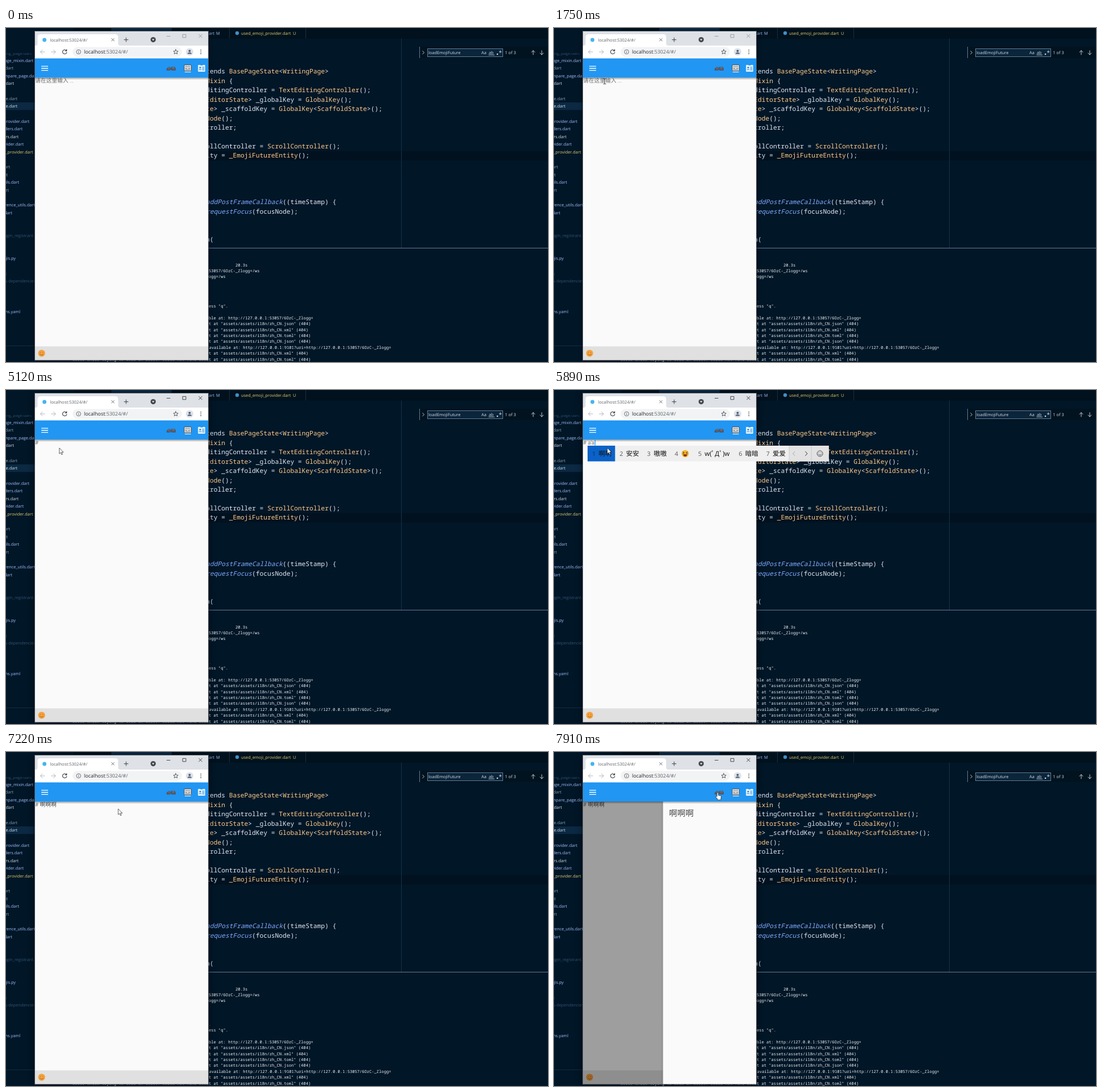
An HTML page that plays this animation: 952x588 px, repeating every 8 s.

```html
<!DOCTYPE html>
<html lang="zh">
<head>
<meta charset="utf-8">
<title>Markdown editor demo</title>
<style>
html, body { margin: 0; width: 100%; height: 100%; overflow: hidden; background: #011627; }
svg { display: block; }
text { white-space: pre; text-rendering: geometricPrecision; }
.ui { font-family: "Open Sans", "Noto Sans", sans-serif; font-size: 7.35px; }
.code { font-family: "Noto Sans Mono", "DejaVu Sans Mono", monospace; font-size: 11.23px; font-weight: 500; fill: #e3e9f4; }
.term { font-family: "Noto Sans Mono", "DejaVu Sans Mono", monospace; font-size: 7.12px; font-weight: 500; fill: #f0f2f4; }
.field { font-family: Roboto, "Noto Sans CJK SC", "Noto Sans CJK", sans-serif; font-size: 9.76px; font-weight: 300; }
.cand { font-family: "Open Sans", "Noto Sans CJK SC", "Noto Sans CJK", sans-serif; font-size: 11.5px; }
.cls { fill: #ffcb8b; }
.fn { fill: #82aaff; font-style: italic; }
.line { fill: none; stroke-linecap: round; stroke-linejoin: round; }
</style>
</head>
<body>
<svg id="stage" width="952" height="588" viewBox="0 0 952 588" xmlns="http://www.w3.org/2000/svg">
  <defs>
    <linearGradient id="barShade" x2="0" y2="1">
      <stop stop-color="#000" stop-opacity=".38"/>
      <stop offset="1" stop-color="#000" stop-opacity="0"/>
    </linearGradient>
    <linearGradient id="sideShade">
      <stop stop-color="#000" stop-opacity="0"/>
      <stop offset="1" stop-color="#000" stop-opacity=".1"/>
    </linearGradient>
    <clipPath id="app"><rect x="51" y="53" width="304.5" height="532"/></clipPath>
    <clipPath id="tree"><rect y="44" width="51" height="544"/></clipPath>
    <g id="face">
      <circle r="6.3" fill="#f6b52c"/>
      <path class="line" stroke="#59331a" d="M-4-2.8L-1.4-1.4L-4 0M4-2.8L1.4-1.4L4 0"/>
      <path fill="#7a2f18" d="M-3.6 1.2H3.6Q2.8 4.9 0 4.9T-3.6 1.2Z"/>
    </g>
  </defs>

  <rect width="952" height="588" fill="#011627"/>
  <g id="editor">
    <rect x="118" width="834" height="18.5" fill="#01111d"/>
    <rect x="185" width="106" height="18" fill="#0b2942"/>
    <path d="M392.5 0V18.5M526.5 0V18.5" stroke="#1c2c3c"/>
    <circle cx="406" cy="9" r="3.2" fill="#3f8fc9"/>
    <rect x="118" y="216.7" width="834" height="16.4" fill="#01111f"/>
    <path d="M694.5 18.5V387" stroke="#17324c"/>
    <path d="M118 387.5H952" stroke="#5f7e97"/>
    <rect y="131" width="51" height="13.4" fill="#0b2942"/>
    <path d="M0 559.5H51" stroke="#122d42"/>
  </g>
  <g id="tree-names" clip-path="url(#tree)"></g>
  <g id="source-text"></g>

  <g id="find">
    <rect x="726" y="33" width="226" height="20" fill="#021320"/>
    <path d="M726.5 33V53" stroke="#5f7e97"/>
    <rect x="740.5" y="36.5" width="132" height="14" fill="#0b253a" stroke="#5f7e97"/>
    <path class="line" stroke="#d6deeb" d="M731.7 40.5L734.5 43.2L731.7 46M926 47V39.8M923 42.7L926 39.7L929 42.7M941 39.8V47M938 44.1L941 47.1L944 44.1" stroke-width=".9"/>
    <path stroke="#d6deeb" d="M847.5 47.5H858" stroke-width=".7"/>
    <rect x="862" y="45" width="2.2" height="2.2" fill="#d6deeb"/>
  </g>

  <rect id="shade" x="50.5" y="5.5" width="305" height="579.5" fill="#dee1e6"/>
  <g id="chrome">
    <path fill="#fff" d="M50.5 31H52Q55.5 31 55.5 27V16Q55.5 11 60.5 11H192Q197 11 197 16V27Q197 31 201 31H355.5V54H50.5Z"/>
    <circle cx="67.5" cy="21" r="3.4" fill="#42b4f0"/>
    <path class="line" stroke="#5f6368" d="M185.4 18.4L190 23M190 18.4L185.4 23" stroke-width=".9"/>
    <path class="line" stroke="#3c4043" d="M207.5 20.7H214.5M211 17.2V24.2"/>
    <circle cx="258.5" cy="20.6" r="4.6" fill="#45494d"/>
    <path fill="#fff" d="M256.4 19.5H260.6L258.5 22.2Z"/>
    <path id="caption" class="line" d="M282.5 14.5H288.2M310.6 11.4H316V16.8H310.6ZM338.7 11.3L344.3 16.9M344.3 11.3L338.7 16.9" stroke-width=".8"/>
    <path class="line" stroke="#b3b6ba" d="M68 42H60.5M64 38.4L60.4 42L64 45.6M79.5 42H87M83.5 38.4L87.1 42L83.5 45.6"/>
    <path class="line" stroke="#45494d" stroke-width="1.2" d="M106 39.7A3.7 3.7 0 1 0 106.7 42.8M106.6 37.9V40.3H104.2"/>
    <rect x="117" y="33.5" width="192" height="17" rx="8.5" fill="#f1f3f4"/>
    <circle cx="127.5" cy="42" r="3.8" fill="none" stroke="#5f6368" stroke-width=".9"/>
    <path d="M127.5 41.4V44.2M127.5 39.7V40.6" stroke="#5f6368" stroke-width=".9"/>
    <path class="line" stroke="#45494d" stroke-width=".9" d="M298.2 37.9L299.4 40.6L302.3 40.9L300.1 42.8L300.8 45.7L298.2 44.2L295.6 45.7L296.3 42.8L294.1 40.9L297 40.6Z"/>
    <circle cx="322.5" cy="42" r="6.6" fill="#dde2ea"/>
    <circle cx="322.5" cy="40.3" r="1.9" fill="#4b5a70"/>
    <path fill="#4b5a70" d="M318.8 45.6Q319 43 322.5 43T326.2 45.6Z"/>
    <path stroke="#3c4043" stroke-width="1.7" stroke-linecap="round" d="M342.3 38.8V38.8M342.3 42V42M342.3 45.2V45.2"/>
  </g>

  <g clip-path="url(#app)">
    <rect x="50" y="87" width="306" height="498" fill="#fafafa"/>
    <rect x="50" y="560.5" width="306" height="25" fill="#e0e0e0"/>
    <circle cx="62.6" cy="572.6" r="6.1" fill="#f3a03c"/>
    <path class="line" stroke="#a9601c" d="M60.5 571V571.4M64.7 571V571.4M59.6 574.4Q62.6 577.4 65.6 574.4" stroke-width=".9"/>
    <g id="field"></g>
    <rect id="caret" y="88" width="1.2" height="9.6" fill="#2196f3"/>
    <g id="drawer">
      <rect x="50" y="87" width="306" height="498" opacity=".37"/>
      <rect x="187" y="87" width="4.5" height="498" fill="url(#sideShade)"/>
      <rect x="191.5" y="87" width="240" height="498" fill="#fafafa"/>
    </g>
    <rect x="50" y="87" width="306" height="4.5" fill="url(#barShade)"/>
    <rect x="50" y="53.5" width="306" height="33.7" fill="#2196f3"/>
    <path d="M62 67.4H74M62 71H74M62 74.6H74" stroke="#fff" stroke-width="1.3"/>
    <g id="tools">
      <path fill="#4f5560" d="M282 72.2L283.5 70H285V68.8H289V71H290V68.6H297V70H298V74.8H290.5V73.4H288.5V74.8H282Z"/>
      <path stroke="#a5606a" stroke-width=".8" d="M284 72.4H288M291.5 72H296.5"/>
      <path stroke="#8aa6bd" stroke-width=".7" d="M285.5 70.3H288M292 70H296"/>
      <rect x="313" y="65" width="12.4" height="10.4" rx="1" fill="#f2f2ee" stroke="#3f4852"/>
      <path class="line" stroke="#4a4f54" stroke-width=".9" d="M315 68Q317.5 67 319.2 68.4Q321 67 323.4 68M315 70.8H318M320.4 70.8H323.4M315 73H323.4"/>
      <path stroke="#f2f2ee" stroke-width="1.2" d="M314 77.3H324.6"/>
      <rect x="337.2" y="65" width="12.6" height="12" rx="1" fill="#e3f2fc"/>
      <circle cx="341" cy="69.8" r="1.5" fill="#2583c9"/>
      <path stroke="#2583c9" d="M338.8 73.3H343.2M344.5 69H348.3M344.5 71.4H348.3M344.5 73.8H348.3M341.5 65.2H345.5"/>
    </g>
  </g>
  <rect x="50.5" y="5.5" width="305" height="579.5" fill="none" stroke="#4d5660" stroke-width=".8"/>
  <g id="popups"></g>
  <g id="pointer">
    <path id="arrow" fill="#fff" stroke="#222" stroke-width=".7" d="M0 0V10.2L2.4 8.1L4 11.8L5.6 11.1L4 7.5H7.2Z"/>
    <path id="beam" class="line" stroke="#333" stroke-width=".9" d="M-2-4.6H-.7L0-4L.7-4.6H2M0-4V4M-2 4.6H-.7L0 4L.7 4.6H2"/>
    <path id="hand" fill="#fff" stroke="#222" stroke-width=".7" d="M-1.2 6.6V1A1.2 1.2 0 0 1 1.2 1V4.4L5 5.2Q6.4 5.6 6.2 7L5.5 10.3V12.4H-.4V10.8L-3.4 7.4Q-3.4 6 -2.1 6.2Z"/>
  </g>
</svg>
<script>
const LOOP = 8000;
const $ = id => document.getElementById(id);

function add(parent, tag, attrs, content = '') {
  const el = document.createElementNS('http://www.w3.org/2000/svg', tag);
  for (const k in attrs) el.setAttribute(k, attrs[k]);
  el.innerHTML = content;
  return parent.appendChild(el);
}
const label = (parent, cls, x, y, str, attrs = {}) =>
  add(parent, 'text', { class: cls, x, y, ...attrs }, str);
const esc = s => s.replace(/&/g, '&amp;').replace(/</g, '&lt;').replace(/>/g, '&gt;');
const show = (el, on) => el.setAttribute('visibility', on ? 'visible' : 'hidden');

// Explorer: centre y, right edge, name, tone
const tones = { n: '#89a4bb', m: '#a2bffc', w: '#d6e2f0', d: '#315270', u: '#e2cf70' };
[
  [44, 45, 'writing_page.dart', 'd'], [57.5, 48, 'page_mixin.dart', 'm'],
  [70.5, 13, 'page.dart', 'n'], [84, 55, 'compare_page.dart', 'm'],
  [97, 14, 'page.dart', 'w'], [124, 20, 'home_page.dart', 'n'],
  [137.5, 20, 'write_page.dart', 'w'], [164, 41, 'provider.dart', 'm'],
  [177.5, 29, 'providers.dart', 'm'], [191, 22, 'providers.dart', 'w'],
  [204.5, 31, 'provider.dart', 'm'], [218, 47.5, 'emoji_provider.dart', 'u'],
  [244.5, 7, 'utils.dart', 'n'], [258, 3, 'utils.dart', 'n'],
  [271.5, 23, 'utils.dart', 'm'], [285, 5, 'utils.dart', 'n'],
  [311.5, 51, 'preference_utils.dart', 'm'], [325, 11, 'main.dart', 'm'],
  [365, 64, 'plugin_registrant.dart', 'd'], [405.5, 17, 'emojis.py', 'm'],
  [432, 1.5, 'plugins', 'd'], [445.5, 52, 'plugins-dependencies', 'd'],
  [499, 25, 'options.yaml', 'm']
].forEach(([y, x, name, tone]) =>
  label($('tree-names'), 'ui', x, y + 2.5, name, { 'text-anchor': 'end', fill: tones[tone] }));

const src = $('source-text');
label(src, 'ui', 366, 11.5, 'dart', { 'text-anchor': 'end', fill: tones.m });
label(src, 'ui', 369, 11.5, 'M', { fill: tones.m });
label(src, 'ui', 413, 11.5, 'used_emoji_provider.dart', { fill: tones.u });
label(src, 'ui', 504, 11.5, 'U', { fill: tones.u });

// Code: row, columns left of the grid origin, text; «» marks a type, ‹› a method call
const ROW = 16.44, COL = 6.738;
[
  [0, 2, 'extends «BasePageState»<«WritingPage»>'],
  [1, 0, '«Mixin» {'],
  [2, 1, 'EditingController = «TextEditingController»();'],
  [3, 0, '«EditorState»> _globalKey = «GlobalKey»();'],
  [4, 0, '«te»> _scaffoldKey = «GlobalKey»<«ScaffoldState»>();'],
  [5, 0, '«Node»();'],
  [6, 0, 'troller;'],
  [8, 0, 'ollController = «ScrollController»();'],
  [9, 0, 'ity = «_EmojiFutureEntity»();'],
  [14, 0, '‹addPostFrameCallback›((timeStamp) {'],
  [15, 0, '‹requestFocus›(focusNode);'],
  [18, 0, 'n(']
].forEach(([row, back, str]) => {
  const html = esc(str)
    .replace(/«/g, '<tspan class="cls">').replace(/‹/g, '<tspan class="fn">')
    .replace(/[»›]/g, '</tspan>');
  label(src, 'code', 351.3 - back * COL, 80.3 + row * ROW, html);
});

const asset = ext => `t at "assets/assets/i18n/zh_CN.${ext}" (404)`;
const local = 'http://127.0.0.1:53057/6OzC-_Zlogg=';
[
  [417, 403, '20.3s'], [427.4, 356, '53057/6OzC-_Zlogg=/ws'], [437.8, 356, 'ogg=/ws'],
  [489.6, 356, 'ess "q".'], [510.4, 356, 'ble at: ' + local],
  [520.8, 356, asset('json')], [531.1, 356, asset('xml')], [541.5, 356, asset('toml')],
  [551.9, 356, asset('json')],
  [562.2, 356.5, 'available at: http://127.0.0.1:9101?uri=' + local],
  [572.6, 356, asset('xml')], [583, 356, asset('toml')],
  [583, 117, 'Error while trying to load an asset: could not find asse']
].forEach(([y, x, str]) => label(src, 'term', x, y + 2.5, str));
label(src, 'term', 356, 481.7, '.', { style: 'fill:#e8643c' });

const find = $('find');
label(find, 'ui', 742, 46, 'loadEmojiFuture', { fill: '#d6deeb' });
label(find, 'ui', 835, 45.8, 'Aa', { fill: '#d6deeb' });
label(find, 'ui', 848, 45.8, 'ab', { fill: '#d6deeb' });
label(find, 'ui', 865.5, 47, '*', { fill: '#d6deeb', style: 'font-size:10px' });
label(find, 'ui', 876.5, 46, '1 of 3', { fill: '#d6deeb' });

label($('chrome'), 'ui', 77.3, 23.7, 'localhost:53024/#/', { fill: '#5f6368', style: 'font-size:7.55px' });
label($('chrome'), 'ui', 137, 45.1, 'localhost<tspan fill="#5f6368">:53024/#/</tspan>',
  { fill: '#202124', style: 'font-size:8.85px' });

const hint = label($('field'), 'field', 51, 96.2, '请在这里输入 ...', { fill: '#6c6c6c' });
const mark = label($('field'), 'field', 51, 96, '#', { fill: '#444' });
const body = label($('field'), 'field', 59.5, 96.2, '', { fill: '#444' });
label($('drawer'), 'field', 202, 112.8, '啊啊啊', { fill: '#444', style: 'font-size:14.5px' });

// Input-method candidates; '*' stands for the drawn face
function popup(words) {
  const g = add($('popups'), 'g', {});
  const bg = add(g, 'rect', { x: 59, y: 98, height: 27.6, fill: '#efefef' });
  let x = 59;
  words.forEach((word, i) => {
    const w = 25.3 + (word === '*' ? 16 : word[0] === 'w' ? 46 : word.length * 11.5);
    if (!i) add(g, 'rect', { x, y: 98, width: w, height: 27.6, fill: '#0a62c9' });
    label(g, 'cand', x + 8, 116, i + 1, { fill: i ? '#555' : '#12305c', style: 'font-size:10.6px' });
    if (word === '*') add(g, 'use', { href: '#face', x: x + 26.5, y: 112 });
    else label(g, 'cand', x + 19.3, 116.2, word, { fill: '#111' });
    x += w;
  });
  bg.setAttribute('width', x + 69.5 - 59);
  add(g, 'rect', { x, y: 98, width: 69.5, height: 27.6, fill: '#e2e2e2' });
  add(g, 'path', { d: `M${x} 98v27.6m39 0v-27.6`, stroke: '#c4c4c4', 'stroke-width': .8 });
  add(g, 'path', { class: 'line', stroke: '#a5a5a5', d: `M${x + 9.8} 108.5l-3.3 3.5l3.3 3.5` });
  add(g, 'path', { class: 'line', stroke: '#333', d: `M${x + 28.5} 108.5l3.3 3.5l-3.3 3.5` });
  add(g, 'circle', { cx: x + 54, cy: 112, r: 5, fill: 'none', stroke: '#333', 'stroke-width': .9 });
  add(g, 'path', { class: 'line', stroke: '#333', 'stroke-width': .9,
    d: `M${x + 52.2} 110.4v.4m3.6-.4v.4M${x + 51.3} 113.3q2.7 2.8 5.4 0` });
  return g;
}
const popups = [
  popup([...'啊阿按爱安*暗']),
  popup(['啊啊', '安安', '嗷嗷', '*', 'w(ﾟДﾟ)w', '暗暗', '爱爱']),
  popup(['啊啊啊', '安安安', '嗷嗷嗷', '啊啊啊啊', '爱爱爱', '暗暗暗', '啊啊啊啊'])
];

// Field: time, text after '#' (null = hint), caret x, popup number
const typing = [
  [0, null, 0], [2000, null, 51], [2540, null, 0], [3000, null, 51],
  [3550, '', 0], [3630, '', 56.6], [4040, '', 0], [4480, '', 56.6],
  [4650, '', 59.4], [5120, '', 0], [5580, 'a', 64.8], [5660, 'a', 64.8, 1],
  [5890, "a'a", 71.6, 2], [6040, "a'a'a", 78.4, 3],
  [6370, '啊啊啊', 88.7], [6910, '啊啊啊', 0], [7370, '啊啊啊', 88.7], [7620, '啊啊啊', 0]
];

// Pointer runs: start, end, step count, shape, then x and y of start, bend and rest
const runs = [
  [350, 660, 5, 'arrow', 900, 545, 500, 470, 214, 401],
  [830, 1220, 6, 'arrow', 175, 340, -35, 150, 98, 97],
  [1380, 1750, 5, 'beam', 103, 103, 92, 101, 89, 94],
  [2330, 2400, 2, 'beam', 92, 101, 94, 105, 95, 108],
  [6910, 7440, 8, 'arrow', 97, 104, 175, 116, 286.5, 74]
];
const moves = [[0, 'arrow', 960, 600], [130, 'arrow', 939, 576]];
for (const [from, to, n, shape, x0, y0, x1, y1, x2, y2] of runs)
  for (let i = 0; i < n; i++) {
    const u = i / (n - 1), bend = (a, b, c) => a * (1 - u) ** 2 + 2 * b * u * (1 - u) + c * u * u;
    moves.push([from + (to - from) * u, shape, bend(x0, x1, x2), bend(y0, y1, y2)]);
  }
moves.push([3400, 'arrow', 93.7, 102], [7440, 'hand', 287.5, 71.8]);
moves.sort((a, b) => a[0] - b[0]);

const at = (steps, t) => steps.findLast(s => s[0] <= t);

function draw(now) {
  const t = now % LOOP;

  const [, str, caretX, pop] = at(typing, t);
  show(hint, str === null);
  show(mark, str !== null);
  if (body.textContent !== (str || '')) body.textContent = str || '';
  show($('caret'), caretX > 0);
  $('caret').setAttribute('x', caretX);
  popups.forEach((p, i) => show(p, pop === i + 1));

  const active = t >= 1920;
  $('caption').setAttribute('stroke', active ? '#222' : '#8b8e92');
  $('shade').style.filter = `drop-shadow(0 ${active ? 2 : 1}px ${active ? 6 : 3}px rgba(0,0,0,.6))`;
  show($('drawer'), t >= 7910);

  const [, shape, x, y] = at(moves, t);
  $('pointer').setAttribute('transform', `translate(${x} ${y})`);
  for (const id of ['arrow', 'beam', 'hand']) show($(id), id === shape);
}

const start = performance.now();
function tick() {
  draw(performance.now() - start);
  requestAnimationFrame(tick);
}
tick();
</script>
</body>
</html>
```
